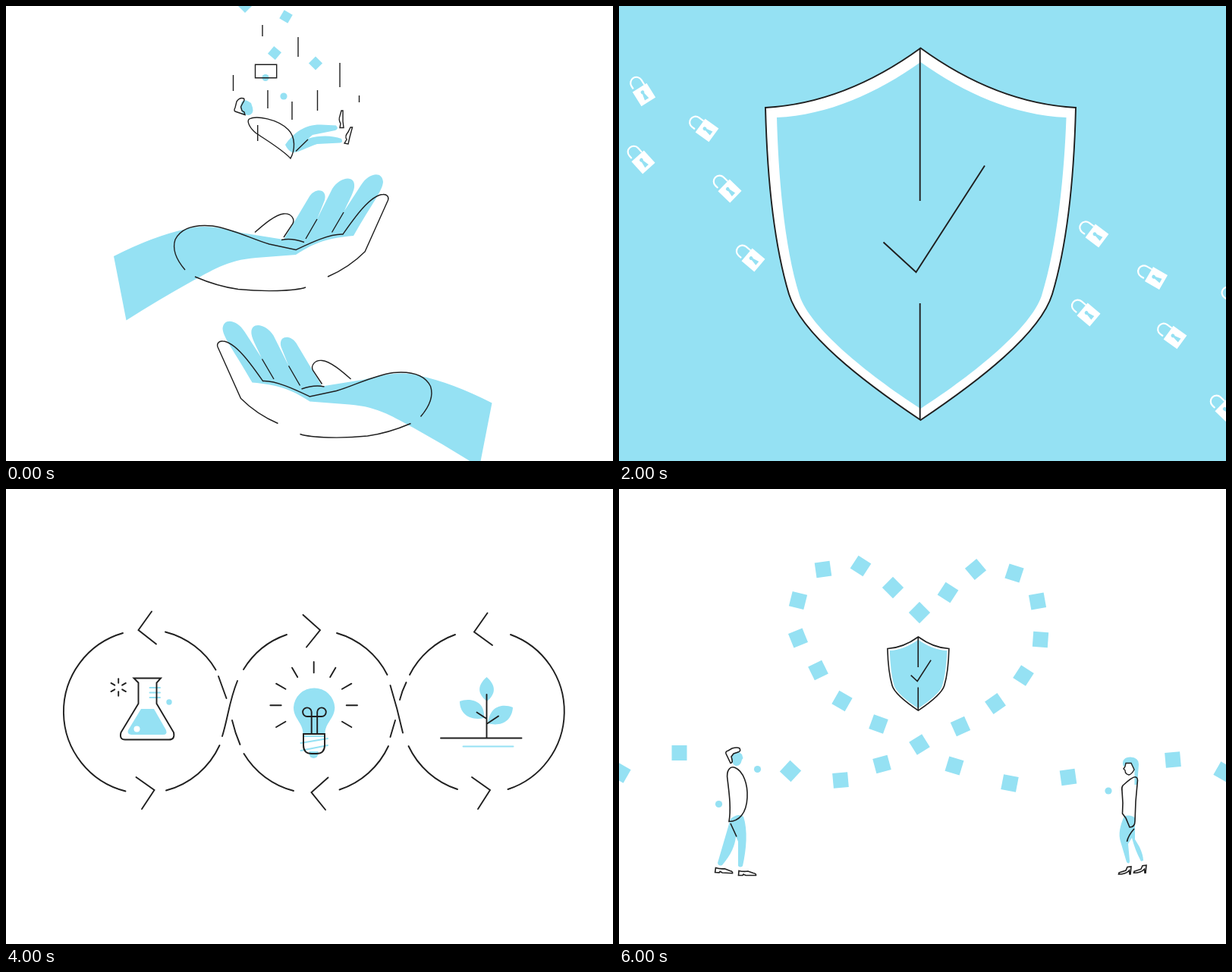
An HTML page with a canvas for the animation above (7000 ms loop, 800 by 600 pixels).

```html
<!DOCTYPE html>
<html lang="en">
<head>
<meta charset="utf-8">
<title>Protection stories</title>
<style>
html, body { margin: 0; width: 100%; height: 100%; overflow: hidden; background: #fff; }
canvas { display: block; }
</style>
</head>
<body>
<canvas id="stage" width="800" height="600"></canvas>
<script>
const ctx = document.getElementById('stage').getContext('2d');
const BLUE = '#95e1f3', INK = '#1f1f1f', WHITE = '#fff', SEA = '#c9eff8';
const SCENE_MS = 1000;

function fill(d, color = BLUE) {
  ctx.fillStyle = color;
  ctx.fill(new Path2D(d));
}
function line(d, width = 1.4, color = INK) {
  ctx.lineWidth = width;
  ctx.strokeStyle = color;
  ctx.stroke(new Path2D(d));
}
function dot(x, y, rx, color = BLUE, ry = rx) {
  ctx.fillStyle = color;
  ctx.beginPath();
  ctx.ellipse(x, y, rx, ry, 0, 0, 7);
  ctx.fill();
}
function ring(x, y, r, width, color) {
  ctx.lineWidth = width;
  ctx.strokeStyle = color;
  ctx.beginPath();
  ctx.arc(x, y, r, 0, 7);
  ctx.stroke();
}
function placed(x, y, deg, sx, sy, draw) {
  ctx.save();
  ctx.translate(x, y);
  ctx.rotate(deg * Math.PI / 180);
  ctx.scale(sx, sy);
  draw();
  ctx.restore();
}
function square(x, y, deg, side) {
  placed(x, y, deg, side, side, () => fill('M-.5-.5H.5V.5H-.5Z'));
}
function rays(x, y, r1, r2, first, step, count) {
  for (let i = 0; i < count; i++) {
    const a = (first + i * step) * Math.PI / 180, c = Math.cos(a), s = Math.sin(a);
    line(`M${x + r1 * c} ${y + r1 * s}L${x + r2 * c} ${y + r2 * s}`, 1.9);
  }
}
function each(values, size, draw) {
  for (let i = 0; i < values.length; i += size) draw(...values.slice(i, i + size));
}
function keyhole(color) {
  dot(0, -3.3, 2.1, color);
  fill('M-.9-3H.9L2.7 6H-2.7Z', color);
}

// Falling figure over two open hands
function hand() {
  fill('M142 330Q195 303 238 294C262 287 290 294 310 299L366 308 400 251C408 239 424 241 420 256L410 281 430 241C440 225 461 222 459 239C458 247 450 260 446 270L468 236C478 220 496 217 497 232C496 244 484 258 458 303C425 306 408 311 382 328L330 332C290 335 270 350 245 363Q200 388 158.5 414.5Z');
  line('M236 348C224 334 219 320 223 308C231 292 250 288 272 290C300 294 325 308 347 314L382 321.5C400 313 427 300 444 301C458 281 480 249 497 248.5C502 248 505 252 503.5 256L473 324Q452 345 424 357');
  line('M249 357C270 366 288 371 306 373.5C340 377 380 376 395 371M328 298.5C340 288 355 275 366 274C376 273 381 281 378 287L366 305M363 308.5Q376 305.5 393 311.5M395 307 410 281M429.5 298.5 445 272');
}
function handsScene() {
  each([315, 0, 45, 369, 14, 30, 354, 62, 40, 408, 75.5, 45], 3,
    (x, y, deg) => square(x, y, deg, 12.8));
  dot(342, 94.5, 4.6);
  dot(366, 119, 4.6);
  each([338, 25, 40, 385, 41, 67, 299.5, 91, 112, 440, 75, 107, 410.5, 111, 138,
    345, 111, 135, 377, 126, 150, 465.5, 118, 127, 331.7, 157, 178], 3,
    (x, top, bottom) => line(`M${x} ${top}V${bottom}`));
  line('M328.5 77.3H356.7V94.7H328.5Z');
  fill('M311 126Q314 123 318 125L323 128 325 134Q327 142 320 144L313 143Q306 134 311 126Z');
  line('M315 143.5 302 139Q300 138 302 134L304 126Q308 120 313.5 122Q315 124 312 128L309.5 133 311 138 314 140Z');
  fill('M368 183C380 166 395 156 415 156.5L435 157.5Q439 162 434 164L404 170 398 175C415 170 430 171 442 175Q445 180 440 180.5L410 182C395 187 385 194 377 193Q371 190 368 183Z');
  line('M375 201C365 190 345 178 330 168C321 161 317 152 320.5 149C330 144 358 149 372 163C382 173 381 190 375 201ZM382 191.5 398 176');
  line('M442 138H444V152L445 160.5H440L441 155Q438 150 440 145ZM454 160H456.5L453 173 451 182 446 181 449 176Q446 172 451 166Z');
  hand();
  placed(782.5, 193.5, 0, -1, 1, hand);
}

// Magnifier with an eye
function lensScene() {
  dot(423, 252, 193.3, BLUE, 192.2);
  fill('M311 252.5C371 147.5 475 147.5 534.7 252.5C475 356.7 371 356.7 311 252.5Z', WHITE);
  dot(423, 252.8, 54.6);
  dot(423.5, 227.5, 10.2, '#222120');
  fill('M419 234H428.5L439 285.3H408.5Z', '#222120');
  ctx.lineCap = 'round';
  line('M160.3 515.8 300.5 376.5', 6.5, '#222120');
  ctx.lineCap = 'butt';
}

// Shield
function shield(width) {
  const outer = 'M397.5 55.5C460 101 530 130 602 134C600 215 592 310 571 380C555 432 475 494 397.5 546C320 494 240 432 224 380C203 310 195 215 193 134C265 130 335 101 397.5 55.5Z';
  fill(outer, WHITE);
  fill('M397.5 74C455 115 520 144 589.5 147C587 220 578 315 557 382C543 424 470 484 397.5 531C325 484 252 424 238 382C217 315 210 220 208 147C275 144 340 115 397.5 74Z');
  line(outer, width);
  line('M396.7 55.5V257M396.7 392V546M348.5 311.5 391.5 351 482 210.5', width);
}
function openLock(x, y, deg) {
  placed(x, y, deg, 1, 1, () => {
    fill('M-11-11H11V11H-11Z', WHITE);
    line('M-8-14V-18.5A7.7 7.7 0 0 1 7.4-18.5V-11', 2.2, WHITE);
    ctx.scale(1.15, 1.15);
    keyhole(BLUE);
  });
}
function shieldScene() {
  fill('M0 0H800V600H0Z');
  each([33, 117, -32, 116, 164, -54, 32, 206, -42, 146, 244, -46, 177, 335, -50, 630, 303, -53,
    708, 359, -60, 619, 407, -50, 733, 437, -54, 801, 534, -46, 818, 388, -57], 3, openLock);
  shield(1.9);
}

// Identity card and a swarm of locks
function lock(x, y, deg, attached) {
  placed(x, y, deg, 1, 1, () => {
    line('M-6-8V-12A6 5.5 0 0 1 6-12V-8', 1.3);
    const h = attached ? 10 : 8.8;
    fill(`M${-h} ${-h}H${h}V${h}H${-h}Z`);
    if (attached) line('M-10-8V10.5H10V-8', 2);
    keyhole(INK);
  });
}
function locks(deg, attached, ...places) {
  each(places, 2, (x, y) => lock(x, y, deg, attached));
}
function cardScene() {
  line('M38 302 54 229Q59 210 78 212L322 273Q344 280 340 297L326 372', 2);
  line('M51 300 64 244 140 263 125 327M156 261 317 301 313 317 153 276ZM148 294 230 315M145 306 228 328M142 317 180 327M263 323 314 335M261 335 311 348M258 347 308 360', 1.9);
  dot(92, 288, 15.8, BLUE, 21);
  line('M77.5 281C75 268 84 264 95 264C108 265 114 272 112 280L109.5 290M78 277Q85 269 93 276Q102 284 111 281M57 313Q66 303 77 304M101 304Q113 313 115 328', 1.9);
  locks(192, true, 46, 313, 98, 324, 187, 325, 216, 334, 239, 352, 263, 364, 288, 369);
  locks(175, true, 73, 325, 125, 338, 158, 337, 317, 381);
  locks(87, true, 312, 275, 346, 296, 333, 341);

  locks(94, false, 455, 62, 610, 46, 610, 139, 717, 135, 654, 220, 386, 381, 308, 446);
  locks(79, false, 601, 266, 556, 302, 387, 323, 477, 504);
  locks(69, false, 533, 102, 328, 206, 372, 436, 642, 448);
  locks(56, false, 386, 239, 560, 214, 454, 347, 454, 413, 422, 471);
  locks(47, false, 420, 139, 664, 321, 529, 396, 507, 456);
  locks(36, false, 341, 118, 484, 175, 744, 285, 510, 319, 595, 370, 566, 454);
  locks(25, false, 516, 244, 441, 279, 728, 395);
  locks(13, false, 450, 226);
  locks(118, false, 95, 381, 362, 492);
  locks(134, false, 204, 376, 208, 430, 259, 415, 281, 486);
  locks(148, false, 156, 381, 159, 434);
}

// Three linked cycles
function cycleScene() {
  ctx.lineCap = 'round';
  each([154, 190, 0, 157.5, 398.5, 210, 188.5, 1, 276.5, 238.5, 281.5, 338, 1, 211, 397.5,
    313, 238, 1, 370, 192, 436, 190, 1, 502.5, 245, 313.5, 349, 0, 379, 398,
    504, 339, 1, 439.5, 396.5, 532, 245, 1, 592, 192, 665, 192, 1, 661.5, 396,
    530.5, 339, 0, 595, 396], 5, (x1, y1, sweep, x2, y2) =>
    line(`M${x1} ${y1}A108 108 0 0 ${sweep} ${x2} ${y2}`, 1.9));
  line('M280 247 290.5 276M305 253C294 280 293 300 285 326M298 305Q302 322 308.5 337M506.5 259Q516 290 523 321.5M519 278Q522 266 527.5 255M513 305 506.5 327', 1.9);
  line('M192 161.5 174.5 186 198 204.5M171.5 380 195.5 397 179 422M391.5 166 414 186 396 208.5M424.5 380.5 402.5 400 421 423M634.5 163.5 617 188.5 641 206M614 380 638 397 622 422', 1.9);

  fill('M178 290H195L211 318Q213 324 207 324H165Q159 323 161 318Z');
  dot(172.5, 316.5, 4, WHITE);
  dot(215, 281, 3.7);
  line('M189.5 262H203M189.5 268.5H203M189.5 275H203', 1.9, BLUE);
  line('M168.5 249.5H204L198.5 255.5V283L221 321Q223 330.5 215 330.5H157Q149 330.5 151.5 321L174.5 283V255.5Z', 1.9);
  rays(148.2, 261.5, 5.7, 11.2, 30, 60, 6);

  fill('M379 288A27.2 27.2 0 0 1 433.3 288C433 303 420.5 308 420.5 323H391.5C391.5 308 379 303 379 288Z');
  fill('M399.5 346H411.5V349A6 6 0 0 1 399.5 349Z');
  line('M392 326H420M388.5 335 424 329M388.5 345 424 338', 1.9, BLUE);
  line('M392 323H420V338Q420 349 409 349H403Q392 349 392 338ZM402.7 323V294A5.8 5.8 0 1 0 397 300H416A5.8 5.8 0 1 0 410.2 294V323', 1.9);
  rays(405.7, 285.3, 43, 57.3, 150, 30, 9);

  fill('M633.5 248C646 259 646 270 634 280C621 270 621 259 633.5 248ZM598 280C610 275 632 278 630 302C612 306 598 297 598 280ZM668 288C655 283 638 285 635 309C652 314 667 306 668 288Z');
  line('M602.5 339.5H668.5', 1.9, BLUE);
  line('M573 328.5H679.5M633.5 271V328.5M620.5 294.5 633.5 303M634 309.5 649 299.5', 1.9);
  ctx.lineCap = 'butt';
}

// World map: a few corner points per coast, roughened by seeded midpoint shifts
let seed;
function random() {
  seed = seed * 16807 % 2147483647;
  return seed / 2147483647 - .5;
}
function roughEdge(path, x1, y1, x2, y2, depth) {
  const length = Math.hypot(x2 - x1, y2 - y1);
  if (!depth || length < 4) return path.lineTo(x2, y2);
  const shift = random() * Math.min(.3, 4 / length);
  const mx = (x1 + x2) / 2 + (y1 - y2) * shift, my = (y1 + y2) / 2 + (x2 - x1) * shift;
  roughEdge(path, x1, y1, mx, my, depth - 1);
  roughEdge(path, mx, my, x2, y2, depth - 1);
}
function coast(...points) {
  const path = new Path2D();
  let [px, py] = points.slice(-2);
  path.moveTo(px, py);
  each(points, 2, (x, y) => {
    roughEdge(path, px, py, x, y, 3);
    [px, py] = [x, y];
  });
  ctx.fillStyle = BLUE;
  ctx.fill(path);
}
function northAmerica() {
  coast(63, 186, 70, 165, 82, 159, 112, 168, 145, 178, 190, 184, 206, 168, 222, 190, 197, 206,
    197, 216, 216, 224, 223, 236, 228, 211, 226, 199, 248, 207, 267, 238, 246, 246, 272, 248,
    245, 262, 240, 272, 226, 290, 218, 298, 222, 312, 214, 302, 195, 301, 188, 308, 190, 318,
    203, 313, 207, 321, 216, 333, 230, 335, 222, 339, 205, 326, 180, 317, 165, 297, 156, 285,
    167, 306, 143, 270, 135, 247, 130, 230, 112, 212, 92, 210, 66, 229, 84, 209, 67, 203);
  coast(238, 109, 336, 108, 333, 140, 331, 156, 322, 170, 298, 192, 291, 208, 283, 205,
    272, 180, 268, 155, 252, 133);
  coast(205, 144, 228, 150, 257, 186, 248, 201, 228, 193, 236, 178, 207, 158);
  coast(143, 152, 165, 146, 178, 168, 160, 174, 139, 166);
  line('M182 148 194 166M190 113H235M158 122 171 119M184 131 222 134M147 136 162 130', 8, BLUE);
}
function southAmerica() {
  coast(221, 343, 228, 333, 238, 327, 272, 337, 278, 345, 305, 358, 298, 386, 286, 397, 281, 407,
    267, 423, 252, 434, 255, 442, 243, 461, 250, 470, 240, 469, 232, 460, 240, 400, 238, 383, 226, 374);
}
function europe() {
  coast(354, 275, 355, 261, 368, 261, 362, 247, 386, 229, 389, 217, 394, 224, 412, 223, 417, 212,
    412, 209, 418, 192, 412, 188, 404, 200, 402, 221, 394, 220, 391, 210, 383, 214, 380, 206,
    397, 175, 424, 159, 445, 172, 434, 182, 455, 170, 494, 172, 500, 150, 506, 184, 526, 156,
    526, 310, 516, 334, 498, 305, 480, 301, 460, 290, 482, 304, 470, 322, 453, 327, 436, 297,
    436, 283, 411, 280, 396, 260, 404, 274, 398, 277, 382, 262, 366, 275);
}
function asia() {
  coast(516, 160, 560, 123, 575, 126, 572, 146, 618, 156, 660, 163, 690, 168, 721, 188, 700, 205,
    672, 215, 658, 238, 660, 220, 670, 205, 630, 215, 618, 228, 634, 236, 630, 254, 608, 268,
    608, 283, 600, 272, 590, 274, 597, 295, 580, 314, 570, 316, 576, 328, 568, 338, 558, 332,
    562, 353, 550, 338, 542, 312, 530, 312, 516, 326);
}
function africa() {
  coast(357, 281, 386, 276, 404, 289, 432, 289, 453, 329, 466, 327, 463, 337, 443, 362, 446, 378,
    437, 389, 434, 402, 424, 412, 406, 417, 392, 380, 393, 365, 384, 344, 356, 342, 340, 325, 342, 308);
}
function islands() {
  coast(580, 392, 602, 378, 618, 370, 630, 373, 637, 384, 640, 368, 655, 398, 648, 426, 637, 426,
    620, 410, 590, 417, 583, 412);
  coast(362, 214, 372, 234, 360, 239);
  line('M459 376 454 393M616 354 632 359 650 365M470 158Q475 133 497 123', 7, BLUE);
  line('M547 336 568 363M570 367 592 369M594 316 603 340M636 256 644 258M635 267 629 280 612 286M634 231 635 248M219 309 246 315M693 418 697 428 680 444', 4, BLUE);
  each([335, 189, 9, 5, 356, 232, 4, 5, 641, 434, 3, 4, 582, 346, 8, 8, 635, 131, 9, 5,
    267, 244, 5, 4, 597, 352, 4, 7, 402, 113, 7, 4, 566, 122, 10, 8, 84, 310, 2, 2], 4,
    (x, y, rx, ry) => dot(x, y, rx, BLUE, ry));
}
function lakes() {
  each([431, 263, 11, 4.5, 464, 262, 5, 12, 212, 252, 8, 2.5, 216, 261, 1.5, 5, 223, 260, 3, 3,
    146, 184, 5, 2, 161, 203, 6, 2, 431, 350, 2.5, 2], 4,
    (x, y, rx, ry) => dot(x, y, rx, SEA, ry));
}
function pin(x, y) {
  ring(x, y, 9.5, 1.2, WHITE);
  ring(x, y, 6, 1.2, WHITE);
  dot(x, y, 3.2, '#000');
}
function mapScene() {
  const sheet = 'M46 108.5H751V487.5H46Z', grid = 'rgba(255,255,255,.22)';
  seed = 77;
  line('M35.5 98.5H761.5V496.5H35.5Z', 1, BLUE);
  fill(sheet, SEA);
  ctx.save();
  ctx.clip(new Path2D(sheet));
  [northAmerica, southAmerica, europe, asia, africa, islands, lakes].forEach(draw => draw());
  for (let x = 88; x < 751; x += 44.5) line(`M${x} 108V487`, 1, grid);
  for (const y of [149, 223, 283, 328, 386, 432]) line(`M46 ${y}H751`, 1, grid);
  ctx.restore();
  line(sheet, 1, BLUE);
  each([145, 270, 203.5, 264.5, 236, 264.5, 194.5, 283.5, 284, 392, 384, 229.5,
    580, 305, 651.5, 411.5], 2, pin);
}

// Two people joined by a heart of squares
function man() {
  const shoe = 'M158 503.5 157.5 509.5H163L164 508 167 509.5H180.5Q181 507 177 506.5L170 504Q164 505 158 503.5Z';
  fill('M149 350 157 346 162 350 163.5 355 162 357Q160 366 154 365Q148 364 149 350Z');
  line('M147 361.5 141 349Q140 346 144 345L149 342Q156 340 159 342Q161 346 157 347L151 349 148 353 149 357Q150 361 147 361.5Z', 1.6);
  fill('M147 435 130 493Q131 498 136 496C148 482 153 470 154 458L157 465V497Q160 500 163 497C168 475 170 450 164 432Q157 427 147 435Z');
  line('M145 438.5C148 420 145 400 143 383C141 370 147 365 153 367.5C164 372 170 390 169 407C168 428 158 438 145 438.5ZM147 441 155 458.5', 1.6);
  line(shoe, 1.6);
  placed(-4, -11.5, 3, 1, 1, () => line(shoe, 1.6));
}
function woman() {
  const face = 'M668 361.5H675L679 370Q676 376 672 377Q667 376 667 371L665 369 667 366Z';
  const heel = 'M659 506 668 503 670 498.5 675 498 674 508H673L672.5 503Q668 508 658.5 508Z';
  fill('M664 363Q663 354 674 353.5Q685 354 685 363L683 390H679.5V372L675 361 665 366Z');
  fill(face, WHITE);
  line(face);
  fill('M666 431C660 445 658 455 661 465L669 492Q673 496 673 490L671 468 676 460Q680 476 688 491L691 490Q691 483 686 472L680 462V434Q676 429 666 431Z');
  line('M681 380Q678 378 664 391Q662 394 663 398L664 414 663.5 428 668 434 673 446Q680 446 680 438L681 412 683.5 384Q683 380 681 380ZM679 448Q671 457 669.5 465', 1.6);
  line(heel, 1.6);
  placed(20, -1.8, 0, 1, 1, () => line(heel, 1.6));
}
function heartScene() {
  each([2, 374, 30, 79.5, 348, 0, 226, 372, 43, 292, 384, -5, 346.5, 363, -15, 396, 337, -32,
    450, 313, -24, 496, 283, -35, 533, 246, 33, 555.5, 198.5, 4, 551.5, 148, -10, 521, 111, 18,
    470, 106, 50, 433.5, 136.5, 33, 396, 163, 45, 361, 130, 45, 318.5, 101.5, 33, 269, 106, -8,
    236, 147, 14, 236, 196.5, -22, 262.5, 239, -26, 294, 279.5, 30, 342, 310, 20, 442, 365, 17,
    515, 388, 11, 592, 380, -8, 730, 357, -5, 797, 373, 30], 3,
    (x, y, deg) => square(x, y, deg, 20));
  each([182.5, 369.5, 131.5, 415.5, 645, 398], 2, (x, y) => dot(x, y, 4.6));
  placed(315.7, 184, 0, .198, .198, () => shield(8.2));
  man();
  woman();
}

const scenes = [handsScene, lensScene, shieldScene, cardScene, cycleScene, mapScene, heartScene];
const start = performance.now();
let shown = -1;

function frame() {
  const index = Math.floor((performance.now() - start) / SCENE_MS) % scenes.length;
  if (index !== shown) {
    shown = index;
    ctx.fillStyle = WHITE;
    ctx.fillRect(0, 0, 800, 600);
    scenes[index]();
  }
  requestAnimationFrame(frame);
}
frame();
</script>
</body>
</html>
```
